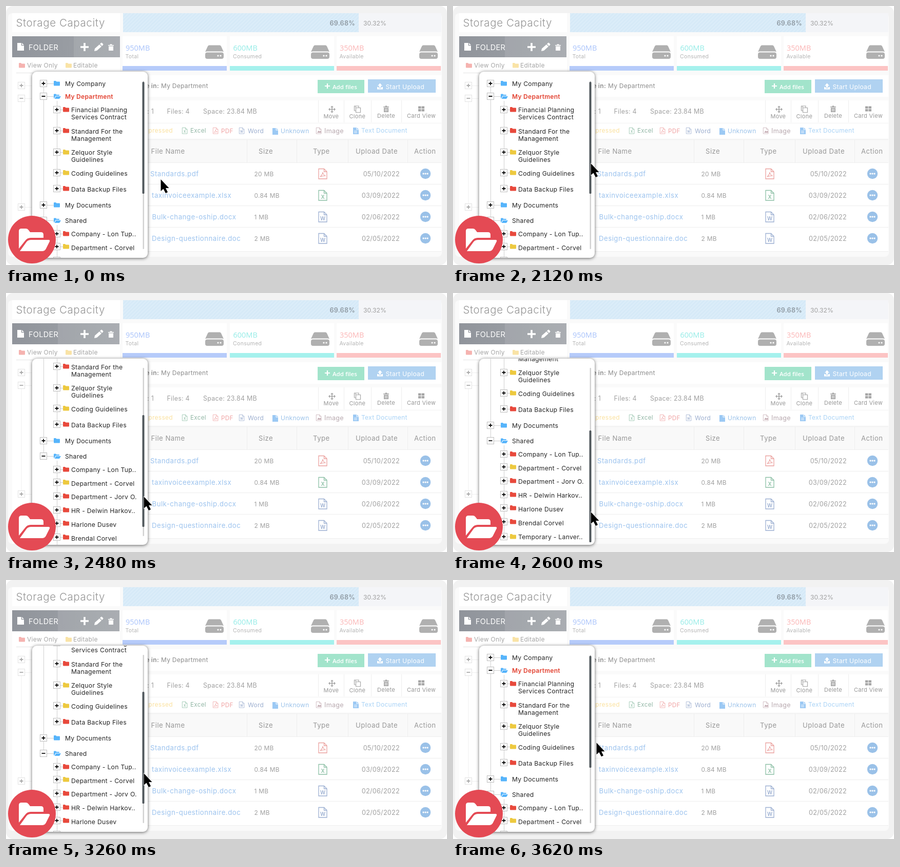
Animation, 859 px wide and 505 px high, one loop 4120 ms. Source, as an HTML page:

```html
<!DOCTYPE html>
<html lang="en">
<head>
<meta charset="utf-8">
<title>File manager</title>
<style>
html, body { margin: 0; width: 100%; height: 100%; overflow: hidden; background: #fff; }
svg { display: block; width: 859px; height: 505px; font-family: Inter, sans-serif; letter-spacing: .28px; }
.panel { filter: drop-shadow(0 1px 3px rgba(0,0,0,.6)); }
</style>
</head>
<body>
<svg id="stage" viewBox="0 0 859 505"></svg>
<script>
const rect = (x, y, w, h, fill, extra = '') =>
  `<rect x="${x}" y="${y}" width="${w}" height="${h}" fill="${fill}" ${extra}/>`;
const path = (d, fill, extra = '') => `<path d="${d}" fill="${fill}" ${extra}/>`;
const line = (d, color, width = 1, extra = '') =>
  path(d, 'none', `stroke="${color}" stroke-width="${width}" ${extra}`);
const at = (x, y, body, scale = 1) => `<g transform="translate(${x} ${y}) scale(${scale})">${body}</g>`;
const text = (x, y, s, color, size = 12.2, extra = '') =>
  `<text x="${x}" y="${y}" fill="${color}" font-size="${size}" ${extra}>${s}</text>`;

const OPEN_SANS = 'font-family="Open Sans, sans-serif" letter-spacing="0"';
const END = 'text-anchor="end"';
const BLUE = '#56b4fb', RED = '#e8493c', YELLOW = '#edc93f';

const folder = (x, y, color) =>
  at(x, y, path('M0 1q0-1 1-1h3l1.5 1.5H11q1 0 1 1V8.500q0 1-1 1H1q-1 0-1-1z', color));
const openFolder = (x, y, color) =>
  at(x, y, path('M0 8V1q0-1 1-1h3l1.5 1.500H10q1 0 1 1V3.500H4L.8 8.500zM4.500 4.500H14L11 9.500H1.500z', color));
const toggle = (x, y, plus, color = '#111', border = '#bdbdbd') =>
  rect(x - 6.5, y - 6.5, 13, 13, '#fff', `stroke="${border}"`) +
  line(`M${x - 3.500} ${y}h7` + (plus ? `M${x} ${y - 3.500}v7` : ''), color, 1.8);
const doc = (x, y, color, mark, scale = 1) => at(x, y,
  line('M.5.5h10.500l5.500 5.500v14H.5zM11 .5v5.500h5.500', color, 1.3) +
  (mark === 'A'
    ? line('M3.500 16q5-5 5-9q1 6 5.500 7q-6 0-10.500 2', color, 1.2)
    : text(8.5, 16.5, mark, color, 10, 'text-anchor="middle" font-weight="600" letter-spacing="0"')), scale);
const page = (x, y, color, w = 11, h = 13) =>
  path(`M${x} ${y}h${w * .6}v${h * .35}h${w * .4}v${h * .65}h${-w}zM${x + w * .7} ${y}l${w * .3} ${h * .27}h${-w * .3}z`, color);
const trash = (x, y, color) => at(x, y,
  path('M0 2h3.500V.5h4V2H11v1.500H0zM1 4.500h9V13H1z', color) + line('M3.500 6v5.500M5.500 6v5.500M7.500 6v5.500', '#fff', .8));
const drive = x => at(x, 76.5,
  path('M8 0h20q2 0 3 2l5 11q-2-1-4-1H4q-2 0-4 1L5 2q1-2 3-2z', '#b0b0b0') +
  rect(0, 14, 36, 12.5, '#b0b0b0', 'rx="4"') +
  '<circle cx="25" cy="20.500" r="1.600" fill="#fff"/><circle cx="30" cy="20.500" r="1.600" fill="#fff"/>');

function backdrop() {
  let s = rect(0, 0, 859, 505, '#f2f2f2', 'rx="14"') + rect(4, 14, 845, 475, '#fafafa', 'rx="8"');

  // Storage bar
  s += rect(12, 14, 210, 37, '#fff') +
    text(19.5, 40, 'Storage Capacity', '#969696', 20.5, 'font-weight="300" letter-spacing=".6"') +
    rect(228, 14, 459, 37, 'url(#stripes)') + rect(687, 14, 161, 37, '#f4f5f8') +
    text(680, 38, '69.68%', '#8f9aa3', 12.5, `${END} font-weight="600"`) +
    text(696, 38, '30.32%', '#a0a0a0', 12.2, 'letter-spacing="0"');

  // Sidebar
  s += rect(12, 100, 210, 389, '#fff') + folder(25, 111, '#f5b3b0') + text(41, 120, 'View Only', '#a5a5a5', 12) +
    folder(116, 111, '#f9e3a6') + text(131, 120, 'Editable', '#a5a5a5', 12) +
    line('M20 130.500H222', '#e3e3e3') + line('M30 187V386M37 155.500H50M37 180.500H50M37 392.500H50', '#f0f0f0') +
    toggle(30, 155, true, '#aaa', '#e2e2e2') + toggle(30, 180, false, '#aaa', '#e2e2e2') +
    toggle(30, 392, true, '#aaa', '#e2e2e2');

  // Totals
  [[227, '950MB', 'Total', '#a9c3fb', '#b6cbfa', 233, 388],
   [436, '600MB', 'Consumed', '#94ece7', '#a5f1ed', 442.5, 594],
   [644, '350MB', 'Available', '#fbb5b5', '#fcc4c4', 650, 805]].forEach(([x, size, label, ink, bar, tx, dx]) => {
    s += rect(x, 59, 203, 58, '#fff') + rect(x, 117, 203, 9, bar) + drive(dx) +
      text(tx, 87, size, ink, 14.5, OPEN_SANS) + text(tx - .5, 102, label, '#b5b5b5', 10.6);
  });

  // Upload row
  s += rect(227, 135, 621, 42, '#fff') + text(298, 160, 'Save in:', '#8c8c8c', 12, `${END} font-weight="600"`) +
    text(302, 160, 'My Department', '#8c8c8c', 12) +
    rect(607, 144, 91, 26, '#a2e4cb') + line('M621 156h10M626 151v10', '#fff', 2.2) +
    text(636, 162, 'Add files', '#fff', 11.5, `${OPEN_SANS} font-weight="600"`) +
    rect(705, 143, 132, 26, '#b0d2f1') +
    path('M728.500 150.500l4.500 5h-3v4h-3v-4h-3zM723 158h3v2.500h5V158h3v4.500h-11z', '#fff') +
    text(739.5, 162, 'Start Upload', '#fff');

  // Toolbar
  s += rect(227, 184, 621, 43, '#fff') + line('M608.500 184V227M658.500 184V227M711.500 184V227M770.500 184V227', '#eee') +
    text(288, 210, 'Folders: 1', '#a0a0a0', 12.4, END) + text(313.5, 210, 'Files: 4', '#a0a0a0', 12.4) +
    text(384, 210, 'Space: 23.84 MB', '#a0a0a0', 12.4) +
    line('M629 201.500h12M635 195.500v12', '#a6a6a6', 1.6) +
    path('M628 201.500l3-3v6zM642 201.500l-3-3v6zM635 194.500l-3 3h6zM635 208.500l-3-3h6z', '#a6a6a6') +
    line('M681 198v-3h-2.500v9h2.500M681.500 198.500h9v9h-9zM679 195h8v3', '#a6a6a6', 1.2) + trash(735, 194, '#a6a6a6');
  for (const x of [803, 809.5]) for (const y of [195.5, 201]) s += rect(x, y, 5.5, 4.5, '#a6a6a6');
  [[618.5, 219, 'Move'], [668.5, 219, 'Clone'], [723, 218, 'Delete'], [781, 218, 'Card View']]
    .forEach(([x, y, label]) => s += text(x, y, label, '#979797', 11));

  // Type filters
  s += rect(227, 230, 621, 28, '#fff') + text(325, 247, 'Compressed', '#fbe2a0', 12, END) +
    doc(343, 237, '#8fbfa7', 'X', .6) + text(359, 247, 'Excel', '#93b7a6', 11.7) +
    doc(403, 237, '#f0a3a3', 'A', .6) + text(419, 248, 'PDF', '#f0a3a3', 11.7) +
    doc(454, 237, '#9eb0d0', 'W', .6) + text(471, 248, 'Word', '#9eb0d0', 12) +
    page(519, 238, '#9cc9f4') + text(535, 248, 'Unknown', '#9cc3ea', 12) +
    doc(604, 237, '#c5adb4', '', .6) + path('M606 247l3-4 2 2 2-2 1 4z', '#c5adb4') +
    text(620, 248, 'Image', '#b9aab0', 12.6) +
    page(676, 237, '#9cc9f4') + line('M678 244h6M678 247h6', '#fff') + text(692, 247, 'Text Document', '#a9d3f6', 12);

  // Table
  s += rect(227, 261, 621, 44, '#f9f9f9') + rect(227, 305, 621, 173, '#fff') +
    line('M227 260.500H848M227 305.500H848M227 347.500H848M227 389.500H848M227 431.500H848M227 478.500H848' +
      'M469.500 261V305M566.500 261V305M666.500 261V305M782.500 261V305', '#eee');
  [[282.5, 'File Name'], [492, 'Size'], [598, 'Type'], [681, 'Upload Date'], [795, 'Action']]
    .forEach(([x, label]) => s += text(x, 288, label, '#989898', 13.1, 'letter-spacing=".5"'));
  [[281, 'Standards.pdf', '20 MB', '05/10/2022', 'A', '#eba3a0'],
   [284, 'taxinvoiceexample.xlsx', '0.84 MB', '03/09/2022', 'X', '#8dc0a6'],
   [284.5, 'Bulk-change-oship.docx', '1 MB', '02/06/2022', 'W', '#9db0d2'],
   [284, 'Design-questionnaire.doc', '2 MB', '02/05/2022', 'W', '#9db0d2']].forEach(([x, name, size, date, mark, color], i) => {
    const y = 327 + 42 * i;
    s += text(x, y + 5, name, '#9cc3ee', 13.2, 'letter-spacing=".5"') + text(483.5, y + 5, size, '#a0a0a0', 11.9) +
      text(767, y + 5, date, '#a0a0a0', 12.6, END) + doc(608.5, y - 10, color, mark) +
      `<circle cx="817" cy="${y}" r="10.200" fill="#9ac1e8"/>`;
    for (const dx of [-4, 0, 4]) s += rect(815.5 + dx, y - 1.5, 3, 3, '#fff', 'rx="1"');
  });
  return s;
}

function folderHeader() {
  return rect(12, 59, 210, 41, 'url(#header)', 'id="header-bar"') +
    rect(132, 59, 90, 41, '#fff', 'id="header-band" opacity=".1"') +
    page(22, 72, '#fff', 13, 15) + text(44, 86, 'FOLDER', '#fff', 14.5) +
    line('M145 80h16M153 72v16', '#fff', 3.6) +
    path('M172 88l1-5 9-8 4 4-9 8zM183 74l2-2q1-1 2 0l2 2q1 1 0 2l-2 2z', '#fff') + trash(199, 74, '#fff');
}

// label lines, text y, toggle y, folder colour; top-level rows also carry a state
const TREE = [
  ['My Company', 152, 151, BLUE, 'closed'],
  ['My Department', 177, 176, BLUE, 'open'],
  ['Financial Planning|Services Contract', 203, 202, RED],
  ['Standard For the|Management', 245, 243, RED],
  ['Zelquor Style|Guidelines', 286, 285, YELLOW],
  ['Coding Guidelines', 327, 325, YELLOW],
  ['Data Backup Files', 358, 356, RED],
  ['My Documents', 389, 388, BLUE, 'closed'],
  ['Shared', 419, 418, BLUE, 'open'],
  ['Company - Lon Tup..', 445, 444, RED],
  ['Department - Corvel', 472, 469, YELLOW],
  ['Department - Jorv O.', 498, 496, RED],
  ['HR - Delwin Harkov..', 525, 523, RED],
  ['Harlone Dusev', 552, 549, RED],
  ['Brendal Corvel', 579, 576, RED],
  ['Temporary - Lanver..', 606, 605, YELLOW]];

function tree() {
  let s = line('M73.500 151V418M99.500 185V356M99.500 427V605', '#cfcfcf');
  for (const [label, ty, y, color, state] of TREE) {
    const x = state ? 73 : 99, current = label === 'My Department';
    s += line(`M${x + 7} ${y + .5}h${state ? 13 : 6}`, '#cfcfcf') + toggle(x, y, state !== 'open');
    s += state === 'open' ? openFolder(93, y - 4.5, color) : folder(state ? 93 : 111, y - 5, color);
    label.split('|').forEach((part, i) => s += text(state ? 115 : 127, ty + 4 + 14 * i, part,
      current ? '#e2402f' : '#262626', current ? 12 : 12.2, current ? 'font-weight="600"' : ''));
  }
  return s;
}

const panel = () =>
  rect(51, 128, 225, 363, '#fff', 'rx="9" class="panel"') +
  `<g clip-path="url(#panel-clip)"><g id="tree">${tree()}</g>` +
  rect(266.5, 146, 2.5, 328, '#d2d2d2', 'rx="1"') + rect(265.5, 148, 4, 218, '#51585d', 'rx="1.500" id="thumb"') + '</g>';

const badge = () => '<circle cx="50.500" cy="455.500" r="46.500" fill="#e44a54"/>' +
  path('M25 473V439q0-5 5-5h9q3 0 5 3l3 4h21q5 0 5 5v6H48q-7 0-11 6z', '#fff') +
  path('M27 478l13-18q3-4 9-4H83q3 0 2 3L78 473q-2 5-8 5z', '#fff');

const cursor = () => path('M0 0V23L5 18.500 9.500 27 13.500 25 9.500 17H16z', '#000',
  'id="cursor" stroke="#fff" stroke-width="1.300" stroke-linejoin="round" paint-order="stroke"');

const stage = document.getElementById('stage');
stage.innerHTML = `<defs>
  <linearGradient id="header"><stop stop-color="#90949b"/><stop offset="1" stop-color="#a0a4a9"/></linearGradient>
  <pattern id="stripes" width="5" height="5" patternUnits="userSpaceOnUse" patternTransform="rotate(45)">
    <rect width="5" height="5" fill="#dcedf9"/><rect width="2.500" height="5" fill="#d5e9f7"/></pattern>
  <clipPath id="panel-clip"><rect x="51" y="128" width="225" height="363" rx="9"/></clipPath>
</defs>` + backdrop() + folderHeader() + panel() + badge() + cursor();

const [bar, band, treeNode, thumb, pointer] =
  ['header-bar', 'header-band', 'tree', 'thumb', 'cursor'].map(id => document.getElementById(id));
const LOOP = 4120, STEP = 40;
const move = (node, x, y) => node.setAttribute('transform', `translate(${x} ${y})`);

function draw(t) {
  const steps = (start, max) => Math.max(0, Math.min(max, Math.floor((t - start) / STEP)));
  const back = t >= 3100;
  const approach = steps(1500, 3) - steps(3580, 1);
  const drag = back ? 11 - steps(3100, 11) : steps(2120, 12);
  const scroll = back ? 12 - steps(3100, 12) : drag && drag + 1;

  move(pointer, 301.5 - 11 * approach, 338 - 31 / 3 * approach + 10 * drag);
  move(thumb, 0, 10 * drag);
  move(treeNode, 0, -10 * scroll);

  const right = t < 1500 ? 222 : 221, split = t < 1500 ? 132 : 101;
  bar.setAttribute('width', right - 12);
  band.setAttribute('x', split);
  band.setAttribute('width', right - split);
}

const begin = performance.now();
function tick() {
  draw((performance.now() - begin) % LOOP);
  requestAnimationFrame(tick);
}
tick();
</script>
</body>
</html>
```
